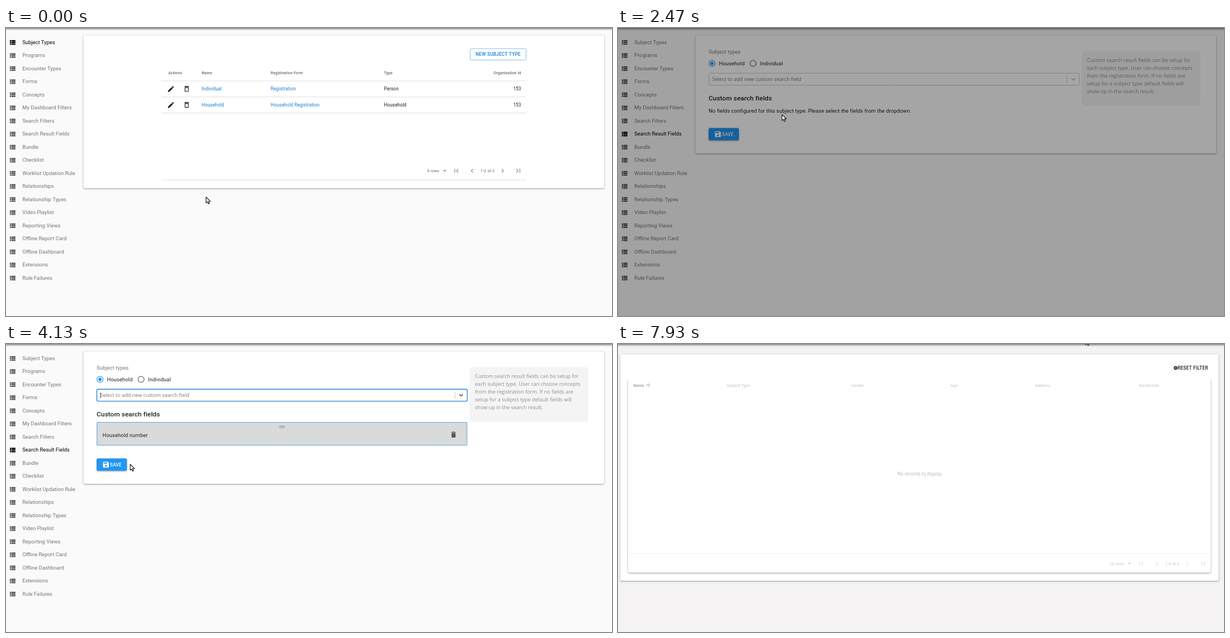
Recreate the animation shown at these times as an HTML page with a canvas. Size 1083 by 517 pixels, loop 8000 ms.

```html
<!DOCTYPE html>
<html lang="en">
<head>
<meta charset="utf-8">
<title>Search result fields</title>
<style>
  html, body { margin: 0; width: 100%; height: 100%; overflow: hidden; background: #fafafa; }
  canvas { display: block; }
</style>
</head>
<body>
<canvas id="stage" width="1083" height="517"></canvas>
<script>
const ctx = document.getElementById('stage').getContext('2d');
const W = 1083, H = 517, LOOP = 8000, UNIT = 0.5875;
const BLUE = '#2196f3', LINK = '#1581d6', GRAY = '#757575', INK = '#212121';
const ROBOTO = 'Roboto, sans-serif', HUMANIST = '"Open Sans", sans-serif';

// Moments of the interaction, in ms
const CLICK_MENU = 1100, ROUTE = 1130, LOADED = 2420, OPEN = 3050, PICK = 4080,
      SAVE = 4930, TOAST = 5060, TOAST_END = 5900, SEARCH_PAGE = 6730, SEARCH_TINT = 7200;

const ICONS = {
  list: 'M4 14h4v-4H4zM4 19h4v-4H4zM4 9h4V5H4zM9 14h12v-4H9zM9 19h12v-4H9zM9 5v4h12V5z',
  edit: 'M3 17.25V21h3.75L17.81 9.94l-3.75-3.75zM20.71 7.04a1 1 0 0 0 0-1.41l-2.34-2.34a1 1 0 0 0-1.41 0l-1.83 1.83 3.75 3.75z',
  binOutline: 'M6 19c0 1.1.9 2 2 2h8c1.1 0 2-.9 2-2V7H6zM8 9h8v10H8zM15.5 4l-1-1h-5l-1 1H5v2h14V4z',
  bin: 'M6 19c0 1.1.9 2 2 2h8c1.1 0 2-.9 2-2V7H6zM19 4h-3.5l-1-1h-5l-1 1H5v2h14z',
  first: 'M18.41 16.59L13.82 12l4.59-4.59L17 6l-6 6 6 6zM6 6h2v12H6z',
  prev: 'M15.41 7.41L14 6l-6 6 6 6 1.41-1.41L10.83 12z',
  next: 'M10 6L8.59 7.41 13.17 12l-4.58 4.59L10 18l6-6z',
  last: 'M5.59 7.41L10.18 12l-4.59 4.59L7 18l6-6-6-6zM16 6h2v12h-2z',
  down: 'M7 10l5 5 5-5z',
  up: 'M4 12l1.41 1.41L11 7.83V20h2V7.83l5.58 5.59L20 12l-8-8z',
  save: 'M17 3H5a2 2 0 0 0-2 2v14a2 2 0 0 0 2 2h14c1.1 0 2-.9 2-2V7zM12 19c-1.66 0-3-1.34-3-3s1.34-3 3-3 3 1.34 3 3-1.34 3-3 3zM15 9H5V5h10z',
  cancel: 'M12 2a10 10 0 1 0 0 20 10 10 0 0 0 0-20zM17 15.6L15.6 17 12 13.4 8.4 17 7 15.6 10.6 12 7 8.4 8.4 7 12 10.6 15.6 7 17 8.4 13.4 12z'
};
for (const name in ICONS) ICONS[name] = new Path2D(ICONS[name]);
const ARROW = new Path2D('M0 0V10.6L2.5 8.4 4.2 12.3 6 11.5 4.3 7.7H7.7Z');
const HAND = new Path2D('M-1.5 1Q-.5-.5 .5 1V4.2L4.5 5Q5.6 5.4 5.4 7.5L4.8 11H.2L-2.8 7.2Q-2.8 5.8-1.5 6.6Z');

const MENU = ['Subject Types', 'Programs', 'Encounter Types', 'Forms', 'Concepts',
  'My Dashboard Filters', 'Search Filters', 'Search Result Fields', 'Bundle', 'Checklist',
  'Worklist Updation Rule', 'Relationships', 'Relationship Types', 'Video Playlist',
  'Reporting Views', 'Offline Report Card', 'Offline Dashboard', 'Extensions', 'Rule Failures'];
const OPTIONS = ['What is the source of drinking water for your house?', 'Permanent Address State',
  'What type of toilet system do you use?', 'Do you have an electricity connection for your house?',
  'Household number', 'What is the type of ownership of your house?',
  'Do you have any of the following at your house?', 'Caste/Community'];
const HELP = ['Custom search result fields can be setup for', 'each subject type. User can choose concepts',
  'from the registration form. If no fields are', 'setup for a subject type default fields will',
  'show up in the search result.'];

// Pointer stops: time, x, y
const POINTER = [[70, 357.5, 303.5], [850, 67, 194], [1800, 67, 194], [2600, 310, 152.5],
  [2980, 325, 93], [3100, 325, 93], [3470, 270, 122], [3560, 270, 122], [4000, 222, 216],
  [4150, 222, 216], [4800, 196, 215.5], [5270, 196, 215.5], [6070, 992, 14], [6350, 989, -15],
  [7750, 850, -16], [7900, 835.5, -9.5], [8000, 835.5, -9.5]];

const clamp = v => Math.max(0, Math.min(1, v));
const progress = (t, from, length) => clamp((t - from) / length);
const ease = p => p * p * (3 - 2 * p);
const between = (t, from, to) => t >= from && t < to;

function pointerAt(t) {
  const i = POINTER.findIndex(stop => stop[0] > t);
  if (i <= 0) return POINTER[0].slice(1);
  const [t0, x0, y0] = POINTER[i - 1], [t1, x1, y1] = POINTER[i];
  const p = ease((t - t0) / (t1 - t0));
  return [x0 + (x1 - x0) * p, y0 + (y1 - y0) * p];
}

function text(str, x, midY, size = 9.4, color = INK, { weight = 400, spacing = 0.0094, align = 'left', family = ROBOTO } = {}) {
  ctx.font = `${weight} ${size}px ${family}`;
  ctx.letterSpacing = `${spacing * size}px`;
  ctx.textAlign = align;
  ctx.fillStyle = color;
  ctx.fillText(str, x, midY + size * 0.355);
}

function icon(name, cx, cy, color, scale = UNIT) {
  ctx.save();
  ctx.translate(cx - 12 * scale, cy - 12 * scale);
  ctx.scale(scale, scale);
  ctx.fillStyle = color;
  ctx.fill(ICONS[name], 'evenodd');
  ctx.restore();
}

function box(x, y, right, bottom, fill, { radius = 2.3, stroke, line = 1, shadow = 0 } = {}) {
  ctx.save();
  ctx.beginPath();
  ctx.roundRect(x, y, right - x, bottom - y, radius);
  if (shadow) {
    ctx.shadowColor = `rgba(0,0,0,${shadow})`;
    ctx.shadowBlur = 3;
    ctx.shadowOffsetY = 1;
  }
  if (fill) { ctx.fillStyle = fill; ctx.fill(); }
  ctx.shadowColor = 'transparent';
  if (stroke) { ctx.strokeStyle = stroke; ctx.lineWidth = line; ctx.stroke(); }
  ctx.restore();
}

const card = (x, y, right, bottom) => box(x, y, right, bottom, '#fff', { shadow: 0.4 });

function rule(x0, y0, x1, y1, color, width = 1) {
  ctx.beginPath();
  ctx.moveTo(x0, y0);
  ctx.lineTo(x1, y1);
  ctx.strokeStyle = color;
  ctx.lineWidth = width;
  ctx.stroke();
}

function disc(x, y, r, fill) {
  ctx.beginPath();
  ctx.arc(x, y, r, 0, Math.PI * 2);
  ctx.fillStyle = fill;
  ctx.fill();
}

function ripple(x, y, r, color, left, top, right, bottom) {
  ctx.save();
  ctx.beginPath();
  ctx.rect(left, top, right - left, bottom - top);
  ctx.clip();
  disc(x, y, r, color);
  ctx.restore();
}

function spinner(cx, cy, age, color) {
  const p = ((age / 1400) % 1 + 1) % 1, turn = 2 * Math.PI, round = 126.9;
  const grow = ease(clamp(2 * p)), chase = ease(clamp(2 * p - 1));
  const tail = 15 * grow + 110 * chase;
  const head = Math.min(tail + 1 + 99 * grow, round);
  ctx.beginPath();
  ctx.arc(cx, cy, 10.8, turn * (p + tail / round), turn * (p + head / round));
  ctx.strokeStyle = color;
  ctx.lineWidth = 2;
  ctx.stroke();
}

function pager(x, y, rows, range, color, arrows = color) {
  text(rows, x + 21, y, 7.05, color, { align: 'right', weight: 500, spacing: 0.01 });
  icon('down', x + 31, y, color);
  icon('first', x + 52, y, arrows);
  icon('prev', x + 80, y, arrows);
  text(range, x + 107.5, y, 7.05, color, { align: 'center', weight: 500, spacing: 0.02 });
  icon('next', x + 134.5, y, arrows);
  icon('last', x + 162.5, y, arrows);
}

function sidebar(t) {
  const active = t < ROUTE ? 0 : 7;
  MENU.forEach((label, i) => {
    const y = 25.5 + 23.5 * i;
    icon('list', 11.6, y + 0.4, i === active ? '#000' : '#555');
    text(label, 29.3, y, 9.4, i === active ? '#000' : GRAY, { spacing: 0 });
  });
  if (between(t, CLICK_MENU, 1800)) {
    const r = 68 * Math.sqrt(progress(t, CLICK_MENU, 350));
    const alpha = 0.19 * (1 - progress(t, 1400, 400));
    ripple(67.5, 194, r, `rgba(0,0,0,${alpha})`, 0, 178, 128, 201.5);
  }
}

function typesTable() {
  card(138.5, 13.5, 1069, 287.5);
  box(829.5, 37, 929.5, 57.5, null, { stroke: '#85bdec' });
  text('NEW SUBJECT TYPE', 879.5, 47.3, 8.22, LINK, { weight: 500, spacing: 0.0286, align: 'center' });
  const head = { weight: 500, spacing: 0.0107 }, right = { spacing: 0.0107, align: 'right' };
  [['Actions', 290], ['Name', 349.5], ['Registration Form', 473], ['Type', 675.5]]
    .forEach(([label, x]) => text(label, x, 80.5, 7.05, '#6c6c6c', head));
  text('Organisation Id', 920.5, 80.5, 7.05, '#6c6c6c', { ...head, align: 'right' });
  [['Individual', 'Registration', 'Person'], ['Household', 'Household Registration', 'Household']]
    .forEach(([name, form, type], i) => {
      const y = 109.5 + 28.7 * i;
      icon('edit', 294.8, y, INK);
      icon('binOutline', 322.9, y - 0.2, INK);
      text(name, 349.5, y, 8.22, LINK, { spacing: 0.0107 });
      text(form, 473, y, 8.22, LINK, { spacing: 0.0107 });
      text(type, 675.5, y, 8.22, INK, { spacing: 0.0107 });
      text('153', 920.5, y, 8.22, INK, right);
    });
  [95, 123.7, 152.4, 272.9].forEach(y => rule(277.5, y, 930, y, '#e0e0e0'));
  pager(753, 256.3, '5 rows', '1-2 of 2', '#858585');
}

function radio(x, label, checked) {
  ctx.beginPath();
  ctx.arc(x, 63.5, 5.4, 0, Math.PI * 2);
  ctx.strokeStyle = checked ? BLUE : '#666';
  ctx.lineWidth = 1.2;
  ctx.stroke();
  if (checked) disc(x, 63.5, 2.9, BLUE);
  text(label, x + 12.4, 63.7);
}

function optionMenu(pointerY) {
  const hovered = Math.max(0, Math.floor((pointerY - 110) / 23.5));
  card(162, 107, 824.5, 284);
  ctx.save();
  ctx.beginPath();
  ctx.rect(162, 107, 662.5, 176.5);
  ctx.clip();
  OPTIONS.forEach((label, i) => {
    const y = 121.7 + 23.5 * i;
    if (i === hovered) box(162, y - 11.7, 817.5, y + 11.8, '#deebff', { radius: 0 });
    text(label, 169, y, 9.08, INK, { family: HUMANIST, spacing: 0 });
  });
  ctx.restore();
  box(821.5, 107.5, 825, 176, '#e08378', { radius: 0 });
}

function saveButton(t, y) {
  const hover = between(t, 4750, 5330);
  box(162, y, 216, y + 22, hover ? '#1976d2' : BLUE, { shadow: 0.4 });
  if (between(t, SAVE, 5400)) {
    const r = 38 * Math.sqrt(progress(t, SAVE, 340));
    ripple(197, 217, r, `rgba(255,255,255,${0.16 * (1 - progress(t, 5100, 300))})`, 162, y, 216, y + 22);
  }
  icon('save', 178.6, y + 10.9, '#fff');
  text('SAVE', 185.7, y + 11, 8.22, '#fff', { weight: 500, spacing: 0.0286 });
}

function fieldsPage(t, pointerY) {
  const added = t >= PICK, focused = between(t, OPEN, SAVE), open = between(t, OPEN, PICK);
  card(138.5, 13.5, 1069, added ? 251 : 225);
  text('Subject types', 162, 42.3, 9.4, GRAY);
  radio(168, 'Household', true);
  radio(241.4, 'Individual', false);
  box(828.5, 41.2, 1041, 139.6, '#f4f4f4', { radius: 6 });
  HELP.forEach((line, i) => text(line, 838, 57.8 + 14.1 * i, 9.08, '#8e8e8e', { family: HUMANIST, spacing: 0 }));

  box(162.4, 81.2, 824.4, 102.6, '#fff', focused
    ? { stroke: '#2684d9', line: 1.4 } : { stroke: '#c8c8c8' });
  text('Select to add new custom search field', 168.5, 91.9, 9.08, '#777', { family: HUMANIST, spacing: 0 });
  if (focused && (t - OPEN) % 1000 < 500) rule(168.7, 87, 168.7, 97.5, INK, 0.8);
  rule(802.5, 86, 802.5, 98, '#ccc');
  ctx.beginPath();
  ctx.moveTo(810.4, 90.4);
  ctx.lineTo(813.5, 93.5);
  ctx.lineTo(816.6, 90.4);
  ctx.strokeStyle = focused ? '#555' : '#bbb';
  ctx.lineWidth = 1.5;
  ctx.stroke();

  text('Custom search fields', 162, 126.2, 11.75, INK, { weight: 500, spacing: 0.0075 });
  if (added) {
    box(162.6, 140.7, 823.8, 181.8, '#d9dbda', { radius: 1, stroke: '#4a97d8', line: 0.9 });
    rule(488.5, 147.3, 498, 147.3, '#777', 0.9);
    rule(488.5, 150, 498, 150, '#777', 0.9);
    text('Household number', 172.5, 163.2);
    icon('bin', 799.8, 162.6, '#555');
  } else {
    text('No fields configured for this subject type. Please select the fields from the dropdown.', 162, 148.5);
  }
  saveButton(t, added ? 205.6 : 179.6);
  if (open) optionMenu(pointerY);
}

function toast(t) {
  const shown = ease(progress(t, TOAST, 225)) * (1 - progress(t, TOAST_END, 150));
  if (!shown) return;
  ctx.save();
  ctx.globalAlpha = shown;
  ctx.translate(541.5, 494);
  ctx.scale(0.75 + 0.25 * shown, 0.75 + 0.25 * shown);
  box(-84.6, -14, 84.6, 14, '#313131', { shadow: 0.3 });
  text('Successfully saved', -75, 0, 8.22, '#fff', { spacing: 0.0107 });
  ctx.restore();
}

function searchPage(t) {
  const faded = '#cfcfcf';
  card(4, 18.5, 1073.5, 425);
  icon('cancel', 996.5, 43, INK, 0.32);
  text('RESET FILTER', 1000, 43.2, 8.22, INK, { weight: 500, spacing: 0.0286 });
  card(18, 62, 1059.5, 410.5);
  box(17, 56, 1061, 63, '#fff', { radius: 0 });
  const head = { weight: 500, spacing: 0.0107 };
  text('Name', 27.5, 74.7, 7.05, '#9a9a9a', head);
  icon('up', 54, 74.6, '#bbb', 0.5);
  [['Subject Type', 194.5], ['Gender', 417.3], ['Age', 594.3], ['Address', 745.5], ['Enrolments', 931]]
    .forEach(([label, x]) => text(label, x, 74.7, 7.05, faded, head));
  text('No records to display', 539, 233, 8.22, '#bcbcbc', { align: 'center', spacing: 0.0107 });
  rule(18, 376.6, 1059.5, 376.6, '#f0f0f0');
  pager(883, 394, '10 rows', '1-0 of 0', faded, '#e2e2e2');
  if (t >= SEARCH_TINT) spinner(538.8, 237, t - 7925, '#5b86ad');
}

function topShadow() {
  const shade = ctx.createLinearGradient(0, 0, 0, 5);
  shade.addColorStop(0, 'rgba(0,0,0,.5)');
  shade.addColorStop(0.45, 'rgba(0,0,0,.18)');
  shade.addColorStop(1, 'rgba(0,0,0,0)');
  ctx.fillStyle = shade;
  ctx.fillRect(0, 0, W, 5);
}

function backdrop(t) {
  const alpha = 0.48 * ease(progress(t, ROUTE, 225)) * (1 - progress(t, LOADED, 190));
  if (!alpha) return;
  ctx.fillStyle = `rgba(0,0,0,${alpha})`;
  ctx.fillRect(0, 0, W, H);
  if (between(t, 1320, LOADED)) spinner(536.5, 246.6, t - 1325, '#eee');
}

function pointer(t, x, y) {
  const shape = between(t, 4780, 5330) ? HAND : ARROW;
  ctx.save();
  ctx.translate(x, y);
  ctx.lineJoin = 'round';
  ctx.strokeStyle = '#111';
  ctx.lineWidth = 1.1;
  ctx.fillStyle = '#fff';
  ctx.fill(shape);
  ctx.stroke(shape);
  ctx.restore();
}

function draw(t) {
  const [x, y] = pointerAt(t);
  ctx.fillStyle = t < SEARCH_TINT ? '#fafafa' : '#f5f2f3';
  ctx.fillRect(0, 0, W, H);
  if (t < SEARCH_PAGE) {
    sidebar(t);
    if (t < ROUTE) typesTable();
    else if (t < LOADED) card(138.5, 13.5, 1069, 60.5);
    else fieldsPage(t, y);
    toast(t);
  } else {
    searchPage(t);
  }
  topShadow();
  backdrop(t);
  pointer(t, x, y);
}

const start = performance.now();
function tick() {
  draw((performance.now() - start) % LOOP);
  requestAnimationFrame(tick);
}
tick();
</script>
</body>
</html>
```
